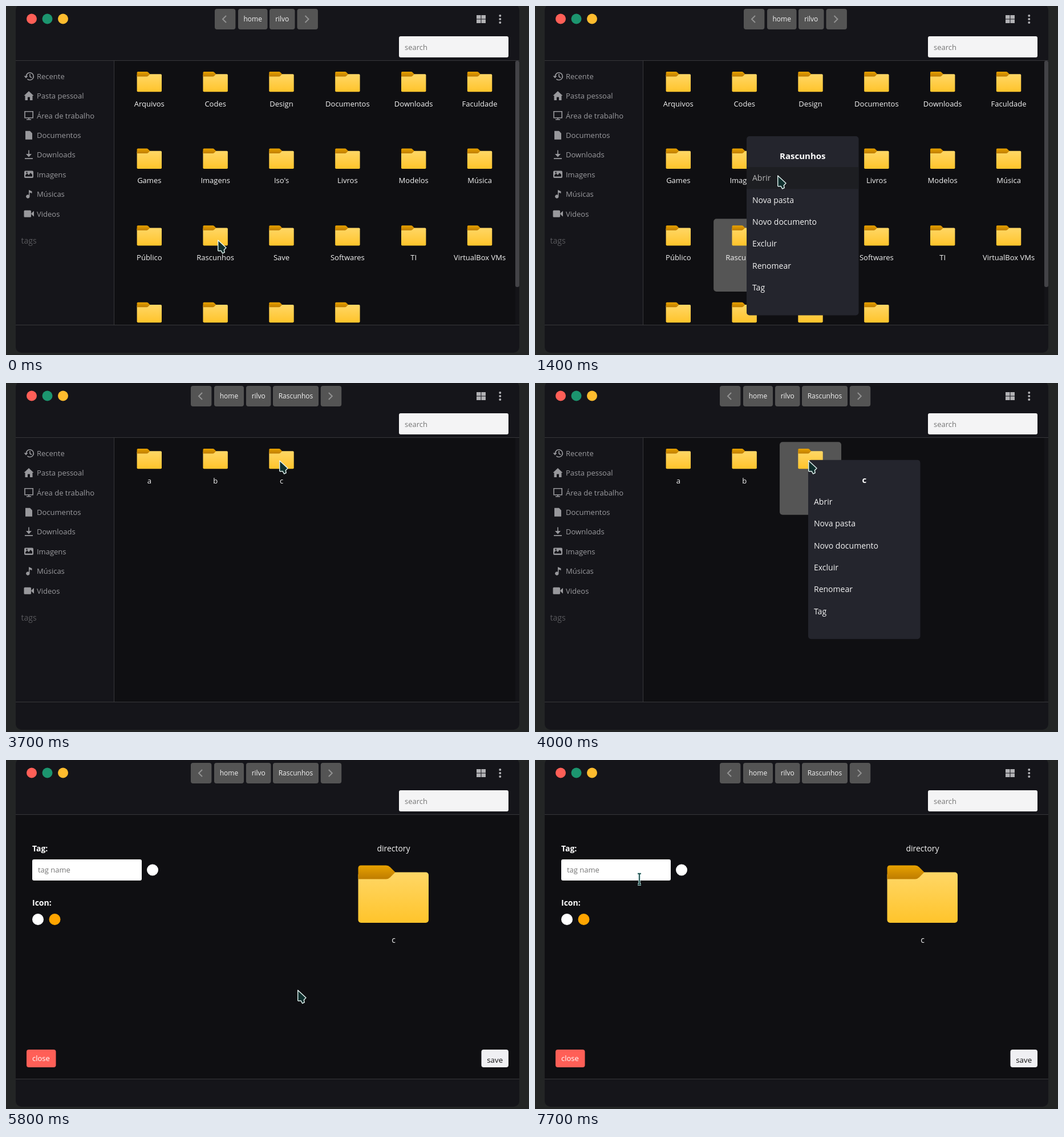
An HTML page that plays this animation: 917 px wide and 611 px high, repeating every 8 s.

```html
<!DOCTYPE html>
<html lang="pt">
<head>
<meta charset="utf-8">
<title>File manager</title>
<style>
  html, body { margin: 0; width: 100%; height: 100%; overflow: hidden; background: #232525; }
  svg { display: block; font-family: "Open Sans", "Noto Sans", sans-serif; font-size: 13px; }
  .mid { text-anchor: middle; }
  .bold { font-weight: 700; }
  .icon { fill: #98989c; }
  .line { fill: none; stroke: #98989c; stroke-width: 1.6; }
</style>
</head>
<body>
<svg width="917" height="611" viewBox="0 0 917 611">
  <defs>
    <linearGradient id="front" x2="0" y2="1"><stop stop-color="#ffd766"/><stop offset="1" stop-color="#ffc42b"/></linearGradient>
    <linearGradient id="tab" x2="0" y2="1"><stop stop-color="#e8a200"/><stop offset="1" stop-color="#be7c00"/></linearGradient>
    <g id="folder">
      <rect y="12" width="123.5" height="88.5" rx="5" fill="url(#front)"/>
      <path d="M0 24V5Q0 0 5 0H49Q53 0 56 3L65 12L56 21Q53 24 49 24Z" fill="url(#tab)"/>
    </g>
    <g id="arrow">
      <path d="M.7 1V18.5Q.7 20 2.2 19.8L6 19.4L8.6 24L12.2 22.3L11.3 18L15 14.2Z"
        fill="#10302e" stroke="#e6f7f4" stroke-width="1.4" stroke-linejoin="round"/>
    </g>
    <g id="beam" fill="none">
      <path id="stem" d="M-3 -9H3M0 -9V10M-3 10H3" stroke="#c4e6e6" stroke-width="3.6"/>
      <path d="M-3 -9H3M0 -9V10M-3 10H3" stroke="#123c3a" stroke-width="1.6"/>
    </g>
  </defs>
  <rect x="17" y="-3" width="883" height="610" rx="10" fill="#15151a"/>
  <g id="scene"></g>
  <g id="pointer"></g>
</svg>
<script>
const LOOP = 8000, USER = 'rilvo', PICKED = 'Rascunhos';
const HOME = ['Arquivos', 'Codes', 'Design', 'Documentos', 'Downloads', 'Faculdade',
  'Games', 'Imagens', "Iso's", 'Livros', 'Modelos', 'Música',
  'Público', PICKED, 'Save', 'Softwares', 'TI', 'VirtualBox VMs', '', '', '', ''];
const PLACES = ['Recente', 'Pasta pessoal', 'Área de trabalho', 'Documentos',
  'Downloads', 'Imagens', 'Músicas', 'Videos'];
const ACTIONS = ['Abrir', 'Nova pasta', 'Novo documento', 'Excluir', 'Renomear', 'Tag'];
const ROW = 38.33, HEAD = 54;

// Pointer stops: time, x, y
const STOPS = [
  [0, 371, 409], [1300, 416, 312], [1400, 425, 296],
  [3500, 443, 248], [3600, 468, 180], [3700, 479, 135],
  [4400, 481, 150], [4500, 487, 205], [4600, 494, 272],
  [4700, 501, 338], [4800, 508, 386], [4900, 511, 402],
  [6300, 430, 355], [6400, 270, 270], [6500, 162, 222],
  [6700, 167, 214], [6800, 183, 208]
];

const rect = (x, y, w, h, fill, r = 0) =>
  `<rect x="${x}" y="${y}" width="${w}" height="${h}" rx="${r}" fill="${fill}"/>`;
const dot = (x, y, r, fill) => `<circle cx="${x}" cy="${y}" r="${r}" fill="${fill}"/>`;
const text = (s, x, y, fill, size = 13, cls = '') =>
  `<text x="${x}" y="${y}" fill="${fill}" font-size="${size}" class="${cls}">${s}</text>`;
const folder = (x, y, scale) =>
  `<use href="#folder" transform="translate(${x} ${y}) scale(${scale})"/>`;

function header(path) {
  let out = dot(45, 22.5, 9, '#ff5f57') + dot(72.5, 22.5, 9, '#1c956f') + dot(100, 22.5, 9, '#febc2e');
  const chevron = (x, d) => rect(x, 5, 36.4, 36, '#545454', 4) +
    `<path d="M${x + 17 - 3 * d} 17l${6 * d} 6l${-6 * d} 6" fill="none" stroke="#929292" stroke-width="2"/>`;
  // Name and box: x, width
  const crumbs = path ? [['home', 365, 52], [USER, 421, 43.5], [path, 468, 80]]
    : [['home', 407, 51.5], [USER, 462, 44.5]];
  out += path ? chevron(324, -1) + chevron(551.8, 1) : chevron(366, -1) + chevron(510.5, 1);
  for (const [name, x, w] of crumbs)
    out += rect(x, 5, w, 36, '#545454', 4) + text(name, x + w / 2, 27.3, '#f2f2f2', 12, 'mid');
  for (const x of [825, 833.5]) for (const y of [16, 23.5]) out += rect(x, y, 7.5, 6.5, '#b2b2b5');
  for (const y of [17, 23, 29]) out += dot(866.3, y, 2, '#b2b2b5');
  return out + rect(689, 53, 192, 37, '#f4f4f5', 3) + text('search', 699, 76.5, '#757575');
}

function sidebar() {
  const icons = [
    '<path class="line" d="M-4.5 0a6.4 6.4 0 1 1 2 4.8M2 -4V.5L5 2.5"/><path class="icon" d="M-8.5 -.5H-1.5L-5 3.5Z"/>',
    '<path class="icon" d="M0 -8.5L8.5 -.5H6.5V7.5H2V2H-2V7.5H-6.5V-.5H-8.5Z"/>',
    '<path class="line" d="M-7 -7H7.2V4H-7ZM0 4V7M-4 7H4"/>',
    '<path class="icon" d="M-6 -7.5H2L6 -3.5V7.5H-6Z"/>',
    '<path class="line" d="M-7 6.5H7M0 -8V2"/><path class="icon" d="M-5 -1.5H5L0 4Z"/>',
    '<rect class="icon" x="-8" y="-6.5" width="16" height="12.5" rx="2"/><path d="M-6 3.5V1L-3 -2L0 1L3 -3L6 0V3.5Z" fill="#15151a"/><circle cx="-3.5" cy="-3.5" r="1.2" fill="#15151a"/>',
    '<path class="icon" d="M0 -7.5L5.5 -5V-1.5L1.5 -3V4A3.2 3.2 0 1 1 0 1.4Z"/>',
    '<path class="icon" d="M-8.5 -4.5Q-8.5 -6 -7 -6H2.5Q4 -6 4 -4.5V4.5Q4 6 2.5 6H-7Q-8.5 6 -8.5 4.5ZM4.5 -1L9 -5V5L4.5 1Z"/>'
  ];
  return PLACES.map((name, i) => {
    const y = 123 + i * 34.4;
    return `<g transform="translate(40 ${y})">${icons[i]}</g>` + text(name, 54, y + 4.7, '#9b9b9f');
  }).join('') + text('tags', 26.5, 415.5, '#58585c', 14) + rect(189, 96, 1, 462, '#37373a');
}

function grid(names, selected) {
  return names.map((name, i) => {
    const x = 251.3 + i % 6 * 115.85, y = 115 + Math.floor(i / 6) * 134.6;
    return (i === selected ? rect(x - 54, y - 11.7, 108, 127.5, '#555', 5) : '') +
      folder(x - 21.7, y, 0.3515) + text(name, x, y + 60.5, '#f4f4f4', 13, 'mid');
  }).join('');
}

function menu(title, x, y, [px, py]) {
  const row = px >= x ? Math.floor((py - y - HEAD) / ROW) : -1;
  let out = rect(x, y, 196.5, 313.5, '#24252d', 5) + text(title, x + 98.3, y + 40, '#fff', 15, 'mid bold');
  ACTIONS.forEach((name, i) => {
    const top = y + HEAD + i * ROW, hot = i === row;
    if (hot) out += rect(x, top, 196.5, ROW, '#1d1e22');
    out += text(name, x + 10, top + 24.2, hot ? '#b4b4b4' : '#f4f4f4', 14);
  });
  return out;
}

function browser(t, pos) {
  const home = t < 2700;
  let out = rect(190, 96, 703, 462, '#0f0f12') + sidebar() + rect(893, 96, 7, 462, '#141418');
  if (home) out += rect(893, 96, 7, 396, '#434347', 3);
  out += home ? grid(HOME, t >= 500 ? 13 : -1) : grid(['a', 'b', 'c'], t >= 4000 ? 2 : -1);
  if (home && t >= 500) out += menu(PICKED, 371, 228, pos);
  if (t >= 4000) out += menu('c', 479, 134.7, pos);
  return out;
}

function tagForm(t) {
  const caret = t >= 7200 && t < 7700;
  return rect(17, 96, 883, 462, '#0f0f12') +
    text('Tag:', 46, 160, '#fff', 14, 'bold') + rect(46, 174, 192, 37, '#fff', 3) +
    text('tag name', 56, 197.3, '#757575') + (caret ? rect(56, 184, 1, 17, '#000') : '') +
    dot(257, 192.5, 10, '#fff') +
    text('Icon:', 46, 255.4, '#fff', 14, 'bold') + dot(56, 279, 10, '#fff') + dot(85.5, 279, 10, '#ffa500') +
    text('directory', 679.5, 160, '#f4f4f4', 14, 'mid') + folder(617.5, 184.5, 1) +
    text('c', 679.5, 320, '#f4f4f4', 14, 'mid') +
    rect(36, 507, 51.5, 31, '#ff5f57', 4) + text('close', 46, 527.3, '#fff') +
    rect(833.5, 507, 47.5, 31, '#f0f0f3', 4) + text('save', 857.2, 530.3, '#111', 13.33, 'mid');
}

const scene = document.getElementById('scene'), pointer = document.getElementById('pointer');
let shown = '';

function draw() {
  const t = performance.now() % LOOP;
  const pos = STOPS.filter(s => s[0] <= t).pop().slice(1);
  const markup = header(t < 2700 ? '' : PICKED) + (t < 5800 ? browser(t, pos) : tagForm(t)) +
    rect(17, 95, 883, 1, '#37373a') + rect(17, 558, 883, 1, '#37373a');
  if (markup !== shown) scene.innerHTML = shown = markup;
  pointer.innerHTML = `<use href="#${t < 6800 ? 'arrow' : 'beam'}" x="${pos[0]}" y="${pos[1]}"/>`;
  requestAnimationFrame(draw);
}
draw();
</script>
</body>
</html>
```
